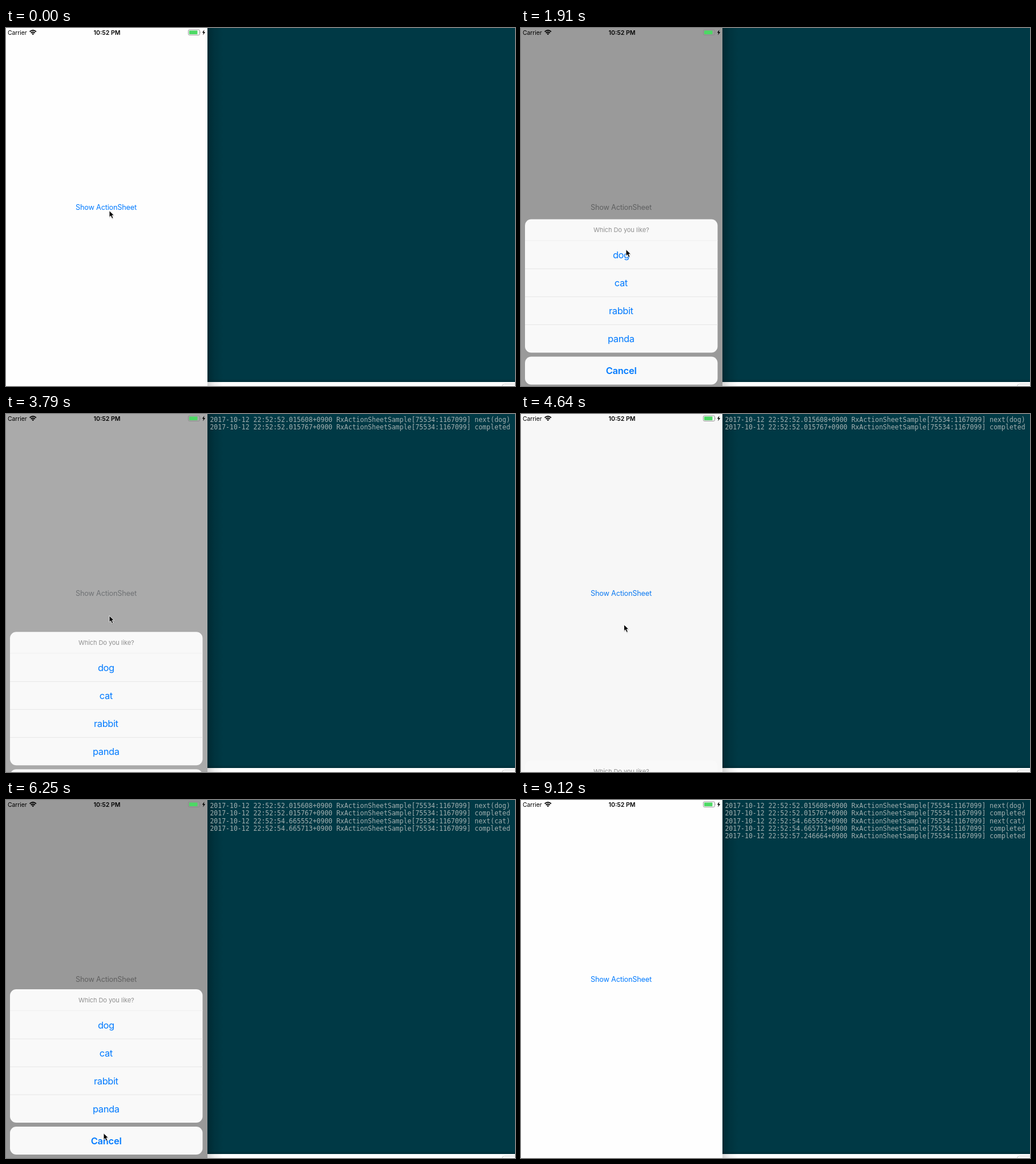
Recreate the animation shown at these times as an HTML page. Size 892 by 628 pixels, loop 9.22 s.

```html
<!DOCTYPE html>
<html lang="en">
<head>
<meta charset="utf-8">
<title>Action sheet demo</title>
<style>
html, body { margin: 0; width: 100%; height: 100%; overflow: hidden; background: #fff; }
svg { display: block; font-family: Inter, "Liberation Sans", sans-serif; }
.mid { text-anchor: middle; }
.row { font-size: 16.4px; letter-spacing: -.36px; fill: #007aff; }
.log { font: 11.5px "DejaVu Sans Mono", monospace; fill: #a4b0b0; white-space: pre; }
</style>
</head>
<body>
<svg width="892" height="628" viewBox="0 0 892 628">
  <defs>
    <linearGradient id="side">
      <stop offset="0" stop-opacity=".27"/>
      <stop offset=".45" stop-opacity=".1"/>
      <stop offset="1" stop-opacity="0"/>
    </linearGradient>
    <linearGradient id="low" x2="0" y2="1">
      <stop offset="0" stop-opacity="0"/>
      <stop offset="1" stop-opacity=".16"/>
    </linearGradient>
    <clipPath id="phone"><path d="M0 0H353V628H0z"/></clipPath>
  </defs>

  <path d="M353 0H892V621H353z" fill="#003945"/>
  <path d="M353 615H892V621H353z" fill="url(#low)"/>
  <path d="M353 0H381V628H353z" fill="url(#side)"/>
  <path d="M353 621H381V628H353z" fill="#fff" opacity=".4"/>
  <rect x="869.5" y="624.5" width="40" height="20" rx="4" fill="#fff" stroke="#ccc"/>
  <g id="logs"></g>

  <g clip-path="url(#phone)">
    <path d="M0 0H353V628H0z" fill="#fefefe"/>
    <text id="button" class="mid" x="175.5" y="319.2" font-size="12.7" letter-spacing="-.18">Show ActionSheet</text>
    <path id="dim" d="M0 0H353V628H0z"/>

    <text x="3" y="11.7" font-size="10.4" letter-spacing="-.05">Carrier</text>
    <g fill="none" stroke="#000" stroke-width="1.9">
      <path d="M41.6 6.5Q47.2 1.6 52.8 6.5M43.7 8.8Q47.2 5.7 50.7 8.8"/>
      <path d="M45.2 10L47.2 12.2 49.2 10Q47.2 8.4 45.2 10z" fill="#000" stroke="none"/>
    </g>
    <text class="mid" x="177" y="11.7" font-size="10.5" font-weight="600">10:52 PM</text>
    <rect x="319.5" y="3" width="20" height="9.4" rx="2" fill="none" stroke="#8b8b8b" stroke-width=".9"/>
    <rect x="321" y="4.5" width="14.5" height="6.4" rx=".7" fill="#4cd964"/>
    <path d="M340.8 6.2q1.3 1.5 0 3z" fill="#8b8b8b"/>
    <path d="M347.6 3L343.8 8.3H346.1L345.2 12.6 349.1 7H346.7z"/>

    <g id="sheet">
      <rect x="7" y="332" width="337.5" height="234" rx="11" fill="#f9f9f9"/>
      <path d="M7 369.5H344.5" stroke="#f0f0f0"/>
      <path d="M7 419H344.5M7 468H344.5M7 517H344.5" stroke="#e6e6e6"/>
      <text class="mid" x="175.8" y="355" font-size="11" letter-spacing="-.06" fill="#8f8f8f">Which Do you like?</text>
      <g id="rows"></g>
      <rect x="7" y="573" width="337.5" height="49" rx="11" fill="#f9f9f9"/>
      <text class="mid row" x="175.6" y="603.7" font-weight="600" style="letter-spacing:-.2px">Cancel</text>
    </g>
  </g>

  <g id="cursor">
    <path d="M0 1.5V13.5L2.8 11 5 15.6 7.2 14.6 5.2 10.2H9z" opacity=".2"/>
    <path d="M0 .5V12L2.6 9.6 4.7 14.2 6.9 13.2 4.9 8.7H8.5z" stroke="#fff" stroke-width=".9"/>
  </g>
</svg>
<script>
const $ = id => document.getElementById(id);
const LOOP = 9220, STEP = 92, GLIDE = 600;

// Button press, first step of the sheet rising, first step of it leaving
const rounds = [
  { press: 740, show: 1010, hide: 1910 },
  { press: 3440, show: 3698, hide: 4456 },
  { press: 5410, show: 5580, hide: 7050 }
];
const bases = [0, ...rounds.flatMap(r => [r.press, r.show, r.hide])];

// Cursor glides: start time and destination
const glides = [
  { time: 1010, to: [184, 388] }, { time: 2800, to: [181, 317] },
  { time: 3698, to: [181, 445] }, { time: 4422, to: [180, 317] },
  { time: 5580, to: [171, 584] }, { time: 7660, to: [420, 585] }
];
const GONE = 7850;

const BLUE = [0, 122, 255], PRESSED = [207, 228, 253], GRAY = [158, 158, 158];
const lerp = (a, b, k) => a + (b - a) * k;
const mix = (a, b, k) => `rgb(${a.map((v, i) => Math.round(lerp(v, b[i], k)))})`;

function addText(parent, cls, x, y, text) {
  const node = document.createElementNS("http://www.w3.org/2000/svg", "text");
  node.setAttribute("class", cls);
  node.setAttribute("x", x);
  node.setAttribute("y", y);
  node.textContent = text;
  $(parent).append(node);
  return node;
}

["dog", "cat", "rabbit", "panda"].forEach((name, i) =>
  addText("rows", "mid row", 175.3, 400.5 + i * 49.2, name));

const logs = [
  [2380, "52.015608", "next(dog)"], [2380, "52.015767", "completed"],
  [4990, "54.665552", "next(cat)"], [4990, "54.665713", "completed"],
  [7490, "57.246664", "completed"]
].map(([time, stamp, event], i) => ({
  time,
  node: addText("logs", "log", 357.4, 14.1 + i * 13.25,
    `2017-10-12 22:52:${stamp}+0900 RxActionSheetSample[75534:1167099] ${event}`)
}));

// Critically damped spring from 0 to 1
function spring(ms) {
  const x = Math.max(0, ms) * .02285;
  return 1 - (1 + x) * Math.exp(-x);
}

function pointer(t) {
  let pos = [181, 320];
  for (const { time, to } of glides) {
    const left = 1 - Math.min(1, Math.max(0, (t - time) / GLIDE));
    pos = pos.map((v, i) => lerp(to[i], v, left * left));
  }
  return pos;
}

function draw(time) {
  const base = bases.filter(b => b <= time).pop();
  const t = base + Math.floor((time - base) / STEP) * STEP;
  const round = rounds.filter(r => r.press <= t).pop();
  let open = 0, from = BLUE;
  if (round && t < round.hide) {
    if (t >= round.show) open = spring(t - round.show + 48.5);
    from = PRESSED;
  } else if (round) {
    open = 1 - spring(t - round.hide + 7);
    if (open < .05) open = 0;
  }
  $("button").setAttribute("fill", mix(from, GRAY, open));
  $("dim").setAttribute("opacity", .4 * open);
  $("sheet").setAttribute("transform", `translate(0 ${296 * (1 - open)})`);
  $("cursor").setAttribute("transform", `translate(${pointer(t)})`);
  $("cursor").style.display = t < GONE ? "" : "none";
  for (const l of logs) l.node.style.display = time >= l.time ? "" : "none";
}

const start = performance.now();
function frame() {
  draw((performance.now() - start) % LOOP);
  requestAnimationFrame(frame);
}
frame();
</script>
</body>
</html>
```
